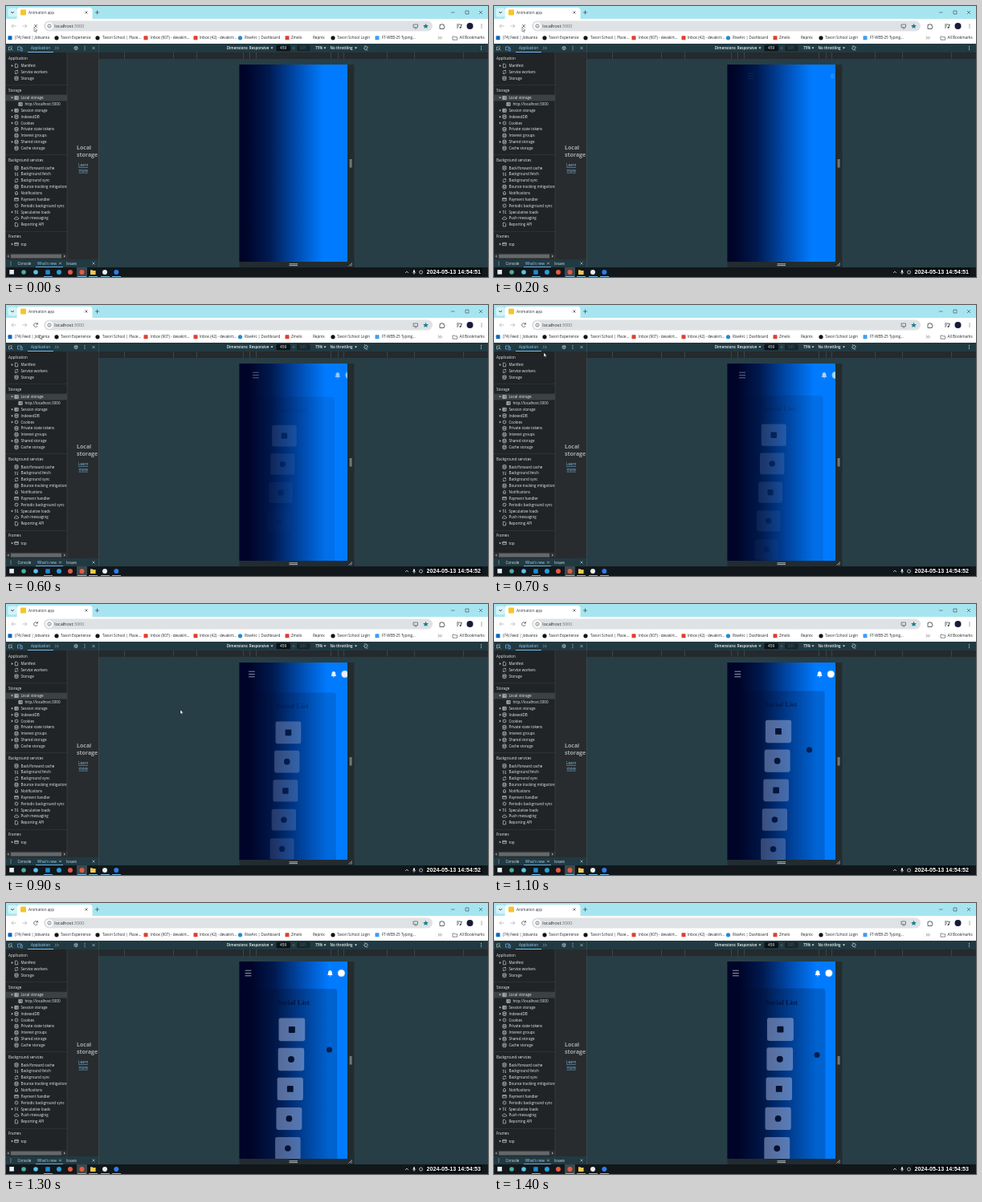
An HTML page for the animation above (1500 ms loop, 600 by 338 pixels).

```html
<!DOCTYPE html>
<html lang="en">
<head>
<meta charset="utf-8">
<title>Animation app</title>
<style>
  html, body { margin: 0; width: 100%; height: 100%; overflow: hidden; background: #273e46; }
  svg { display: block; width: 100vw; height: 100vh; }
  text { font-family: "Open Sans", "Noto Sans", sans-serif; white-space: pre; }
</style>
</head>
<body>
<svg id="stage" viewBox="0 0 600 338" xmlns="http://www.w3.org/2000/svg"></svg>
<script>
const LOOP = 1500, STEP = 100;
const stage = document.getElementById('stage');
const out = [];
const add = s => out.push(s);

// Drawing helpers
const rect = (x, y, w, h, fill, r = 0, more = '') =>
  add(`<rect x="${x}" y="${y}" width="${w}" height="${h}" rx="${r}" fill="${fill}" ${more}/>`);
const dot = (x, y, r, fill, more = '') =>
  add(`<circle cx="${x}" cy="${y}" r="${r}" fill="${fill}" ${more}/>`);
const line = (d, color, w = 0.7, more = '') =>
  add(`<path d="${d}" fill="none" stroke="${color}" stroke-width="${w}" ${more}/>`);
const label = (x, y, s, fill, size = 4.5, more = '') =>
  add(`<text x="${x}" y="${y + size * 0.36}" font-size="${size}" fill="${fill}" ${more}>${s}</text>`);
const cross = (x, y, r, color, w = 0.7, more = '') =>
  line(`M${x - r} ${y - r}l${2 * r} ${2 * r}m0 ${-2 * r}l${-2 * r} ${2 * r}`, color, w, more);
const caret = (x, y, color) => add(`<path d="M${x} ${y - 1}h3l-1.5 2z" fill="${color}"/>`);
const more = (x, y, color) => [-2, 0, 2].forEach(d => dot(x, y + d, 0.55, color));

function browser() {
  const ink = '#3c4043', pale = '#a9aeb3';
  rect(0, 0, 600, 17, '#a6e5f0');
  rect(2.5, 2.5, 11, 11, '#d3f3f8', 3);
  line('M6 7l2 2l2 -2', '#203038', 0.8);
  rect(13.5, 2, 94, 20, '#fff', 3.5);
  rect(18, 4.5, 7, 7, '#f6c52b', 1);
  label(28, 8, 'Animation app', '#303438', 4.7);
  cross(100, 8, 1.5, ink);
  line('M113.5 5.5v5m-2.5 -2.5h5', ink);
  line('M554 8h4.5M572 6h4v4h-4z', ink, 0.6);
  cross(591, 8, 2, ink, 0.6);

  rect(0, 16, 600, 31, '#fff');
  line('M12.5 25h-5.5m2.3 -2.3l-2.3 2.3l2.3 2.3M20.5 25h5.5m-2.3 -2.3l2.3 2.3l-2.3 2.3', pale);
  cross(37, 25, 1.9, ink, 0.7, 'id="stop"');
  line('M39.2 24a2.4 2.4 0 1 0 0 2M39.4 22v2.1h-2.1', ink, 0.7, 'id="reload"');
  rect(47, 18.5, 484, 13, '#dfe2e4', 6.5);
  dot(54, 25, 4.6, '#fff');
  dot(54, 25, 2.2, 'none', `stroke="${ink}" stroke-width=".6"`);
  line('M54 24.6v1.6M54 23.5v.5', ink, 0.6);
  add(`<text x="60.3" y="26.9" font-size="5.5" fill="#202124">localhost<tspan fill="#6b7075">:3000</tspan></text>`);
  line('M507 23h5.5v3.6h-5.5zM508.5 28h3', '#44545e', 0.7);
  add('<path d="M522.5 21.7l1 2.2 2.4.2-1.8 1.6.6 2.4-2.2-1.3-2.2 1.3.6-2.4-1.8-1.6 2.4-.2z" fill="#16808f"/>');
  line('M540 23.5h1.6a1 1 0 1 1 2 0h1.5v1.6a1 1 0 1 1 0 2v1.4h-5.1z', ink, 0.8);
  line('M561 23h5M561 25h3M561 27h2M566.5 27v-3.6h1.5', ink, 0.8);
  dot(565.5, 27, 1, ink);
  dot(577.5, 25, 4, '#171a3a');
  more(592, 25, ink);

  const marks = [
    [5, 11, '(74) Feed | Jobvanta', '#0a66c2', 1], [63, 68, 'Tavori Experience', '#151515'],
    [114, 120, 'Tavori School | Place...', '#151515'], [174, 180, 'Inbox (907) - devakirt...', '#dd4033', 1],
    [236, 241, 'Inbox (42) - devakirt...', '#dd4033', 1], [291.5, 297, 'RiseArc | Dashboard', '#238bd0'],
    [350, 355, 'Zmelo', '#dd4033', 1], [0, 382, 'Repnix', ''],
    [407, 412, 'Tavori School Login', '#151515'], [462, 468, 'FT-WEB-25 Typing...', '#3f9df0', 1]
  ];
  for (const [ix, tx, name, color, square] of marks) {
    if (ix && square) rect(ix - 2.5, 37.3, 5, 5, color, 0.6);
    else if (ix) dot(ix, 39.8, 2.6, color);
    label(tx, 39.8, name, '#202428', 4.6);
  }
  line('M538 38l1.7 1.7l-1.7 1.7m2.5 -3.4l1.7 1.7l-1.7 1.7', ink, 0.6);
  line('M556 38h2l.7 .8h3v3.4h-5.7z', ink, 0.6);
  label(564.5, 39.8, 'All Bookmarks', '#202428', 4.7);
}

function listIcon(x, y, kind) {
  const c = '#d3d7da';
  const shapes = {
    db: 'M-2 -1.6a2 .9 0 1 0 4 0a2 .9 0 1 0 -4 0v3.2a2 .9 0 0 0 4 0v-3.2M-2 0a2 .9 0 0 0 4 0',
    grid: 'M-2.2 -2h4.4v4h-4.4zM-2.2 -.6h4.4M-2.2 .7h4.4M-.7 -2v4',
    page: 'M-1.7 -2.3h2.2l1.2 1.2v3.4h-3.4z',
    ring: 'M-2 0a2 2 0 1 0 4 0a2 2 0 1 0 -4 0M-.6 -.5h.4M.5 .6h.4',
    sync: 'M-2 0a2 2 0 0 1 3.4 -1.4M2 0a2 2 0 0 1 -3.4 1.4M1.6 -2.4v1.2h-1.2M-1.6 2.4v-1.2h1.2',
    swap: 'M-1.2 2.2v-4.2l-1 1M1.2 -2.2v4.2l1 -1',
    bell: 'M-2 1.3h4M-1.4 1.2v-1.7a1.4 1.4 0 0 1 2.8 0v1.7M-.4 2.2h.8',
    card: 'M-2.3 -1.7h4.6v3.4h-4.6zM-2.3 -.6h4.6',
    cloud: 'M-1.5 1.4a1.1 1.1 0 0 1 0 -2.2a1.7 1.7 0 0 1 3.2 .2a1 1 0 0 1 0 2z'
  };
  line(shapes[kind], c, 0.65, `transform="translate(${x} ${y})"`);
}

function tools() {
  const ink = '#eceef0', bar = '#213a42';
  rect(0, 58, 115.5, 258, '#282c2e');
  rect(0, 58, 76, 258, '#202426');
  rect(0, 47, 600, 11, bar);
  line('M8 51h-4.5v4h2M6 53l2.5 2.5m-2.5 -.7v-1.8h1.8', '#b9c0c5', 0.7);
  line('M14.5 51h4.5v1M14.5 51v4h2M18 52.5h2.3v3.3h-2.3z', '#79b8ee', 0.7);
  label(31, 52.5, 'Application', '#9cd3f5', 4.6);
  rect(27, 57, 32, 1, '#79b8ee');
  line('M61 50.8l1.7 1.7l-1.7 1.7m2.7 -3.4l1.7 1.7l-1.7 1.7', '#b9c0c5', 0.6);
  dot(87, 52.5, 1.9, 'none', 'stroke="#cfd4d7" stroke-width="1.2" stroke-dasharray="1 .5"');
  dot(87, 52.5, 0.7, '#cfd4d7');
  more(98, 52.5, '#cfd4d7');
  cross(109, 52.5, 1.6, '#cfd4d7', 0.6);

  rect(0, 110.7, 76, 7.8, '#3c4143');
  const head = (y, s) => label(3, y, s, ink, 4.55);
  head(65, 'Application');
  head(105, 'Storage');
  head(192.5, 'Background services');
  head(287.5, 'Frames');
  for (const y of [98, 185.5, 281]) rect(0, y, 76, 0.5, '#3d4042');

  // A leading > marks a row that can be opened, v one that is open.
  const group = (y, rows) => rows.forEach(([kind, name, sign], i) => {
    const cy = y + i * 7.85, deep = sign === '+' ? 5 : 0;
    listIcon(13 + deep, cy, kind);
    label(18.5 + deep, cy, name, ink, 4.55);
    if (sign === '>') add(`<path d="M6.8 ${cy - 1.5}l2 1.5l-2 1.5z" fill="#c3c7ca"/>`);
    if (sign === 'v') caret(6, cy, '#c3c7ca');
  });
  group(74.5, [['page', 'Manifest', '>'], ['sync', 'Service workers'], ['db', 'Storage']]);
  group(114.6, [['grid', 'Local storage', 'v'], ['grid', 'http://localhost:3000', '+'],
    ['grid', 'Session storage', '>'], ['db', 'IndexedDB', '>'], ['ring', 'Cookies', '>'],
    ['db', 'Private state tokens'], ['db', 'Interest groups'], ['db', 'Shared storage', '>'],
    ['db', 'Cache storage']]);
  group(202, [['db', 'Back/forward cache'], ['swap', 'Background fetch'], ['sync', 'Background sync'],
    ['db', 'Bounce tracking mitigations'], ['bell', 'Notifications'], ['card', 'Payment handler'],
    ['ring', 'Periodic background sync'], ['swap', 'Speculative loads', '>'],
    ['cloud', 'Push messaging'], ['page', 'Reporting API']]);
  group(297, [['card', 'top', '>']]);
  rect(0, 308.5, 76, 7, '#2d2f31');
  rect(6, 309.7, 63, 4.8, '#65686a');
  add('<path d="M3.5 310.5v3.2l-2 -1.6zM72 310.5v3.2l2 -1.6z" fill="#9a9da0"/>');

  rect(76, 58, 39.5, 258, '#282c2e');
  rect(75.7, 58, 0.6, 258, '#43474a');
  label(88, 176, 'Local', '#a2a7ab', 7, 'font-weight="700"');
  label(88, 185, 'storage', '#a2a7ab', 7, 'font-weight="700"');
  label(90, 198.5, 'Learn', '#83c7f5', 4.6, 'text-decoration="underline"');
  label(90.5, 205.2, 'more', '#83c7f5', 4.6, 'text-decoration="underline"');

  rect(0, 316, 115.5, 10, bar);
  more(6, 321, '#cfd4d7');
  label(14.5, 321, 'Console', '#dfe4e7', 4.5);
  label(39, 321, 'What\'s new', '#9cd3f5', 4.5);
  cross(67.5, 321, 1.3, '#cfd4d7', 0.6);
  rect(37, 325, 34, 0.9, '#79b8ee');
  label(75, 321, 'Issues', '#dfe4e7', 4.5);
  cross(109, 321, 1.5, '#cfd4d7', 0.6);
  rect(115, 47, 0.7, 279, '#47545a');
}

function device() {
  const ink = '#edf3f5';
  const bold = 'font-weight="600"';
  label(274.8, 52.5, 'Dimensions: Responsive', ink, 4.5, bold);
  caret(329.5, 52.5, ink);
  rect(336.5, 48.7, 17.5, 7.5, '#0c1417', 1);
  label(341, 52.5, '459', ink, 4.8);
  cross(358, 52.5, 1, '#91a0a5', 0.5);
  rect(362, 48.7, 16.5, 7.5, '#17262c', 1);
  label(366, 52.5, '835', '#506168', 4.6);
  label(385, 52.5, '75%', ink, 4.5, bold);
  caret(395.5, 52.5, ink);
  label(403.5, 52.5, 'No throttling', ink, 4.5, bold);
  caret(434, 52.5, ink);
  line('M445.5 52.6l3 -2.6l2 2.2l-3 2.7zM446 50.4l1 -1.2M450 54.6l-1 1.2', ink, 0.7);
  more(591.5, 52.5, ink);
  rect(115.5, 58, 484.5, 8, '#242a2d');
  for (const x of [147, 208, 237, 295, 303, 311, 404, 413, 420, 474, 508, 569])
    rect(x, 58, 0.5, 7.6, '#566065');
  rect(290.5, 73, 143, 253, '#222c30');
  rect(427.6, 191, 3, 10.5, '#6f787b');
  rect(352.5, 321.3, 10.5, 0.9, '#c0c6c8');
  rect(352.5, 323.2, 10.5, 0.9, '#c0c6c8');
  line('M426.5 324.5l4.5 -4M429 324.5l2 -1.8', '#c0c6c8', 0.8);
}

function app() {
  add(`<defs><clipPath id="screen"><path d="M290.5 73h134.5v246h-134.5z"/></clipPath>
    <linearGradient id="sky" gradientUnits="userSpaceOnUse" x1="298" x2="395" y1="0" y2="0">
      <stop offset="0" stop-color="#000428"/><stop offset=".3" stop-color="#001a50"/>
      <stop offset=".65" stop-color="#004bad"/><stop offset="1" stop-color="#007bff"/>
    </linearGradient></defs><g clip-path="url(#screen)">`);
  rect(290, 73, 136, 247, 'url(#sky)');
  rect(0, 0, 1, 240, '#000a28', 4, 'id="panel"');
  add(`<text id="title" text-anchor="middle" font-size="9" font-weight="700" fill="#020d2c"
    style="font-family:'Liberation Serif',serif">Social List</text>`);
  for (let i = 0; i < 5; i++) {
    add(`<g class="card">`);
    rect(-16.5, -14.5, 33, 29, '#b9c4e8', 2.5, 'fill-opacity=".47"');
    if (i % 2 || i === 4) dot(0, 0, 4, '#07112f');
    else rect(-4, -4, 8, 8, '#07112f', 1);
    add('</g>');
  }
  add('<g id="menu">');
  line('M-3.9 -3.3h7.8M-3.9 0h7.8M-3.9 3.3h7.8', '#c9d4ea', 0.8);
  add('</g><g id="icons">');
  add('<path d="M-3.4 2.4q1 -.8 1 -2.2v-1.2a2.4 2.4 0 0 1 1.8 -2.2a.6 .6 0 0 1 1.2 0a2.4 2.4 0 0 1 1.8 2.2v1.2q0 1.4 1 2.2zM-1 3h2a1 1 0 0 1 -2 0z" fill="#fff"/>');
  dot(14, 0, 4.8, '#7fb2f0');
  dot(14, 0, 4, '#fff');
  add('</g></g>');
}

function taskbar() {
  rect(0, 326, 600, 12, '#11171b');
  rect(4.3, 329, 5.6, 5.6, '#e7eef2');
  rect(88, 326, 13, 12, '#3d484d');
  dot(22, 332, 2.8, '#4fae9a');
  dot(37, 332, 2.8, '#5dc3e6');
  rect(49.2, 329.2, 5.6, 5.6, '#1f8ad2', 0.6);
  dot(66, 332, 3, '#28a0d8');
  dot(80, 332, 3, '#e45b42');
  dot(94.5, 332, 3, '#e45b42');
  add('<path d="M105 329.3h2.4l.8 .8h3.4v4.8h-6.6z" fill="#f3c84b"/>');
  dot(123, 332, 3, '#e8edf0');
  dot(137.3, 332, 3, '#2d7df0');
  for (const x of [47, 89, 103, 118, 132]) rect(x, 337, 11, 1, '#6fb6de');
  line('M497 333l2 -2l2 2', '#e8edf0', 0.7);
  rect(507, 329.2, 2, 3.5, '#e8edf0', 1);
  line('M506.2 331.7a1.8 1.8 0 0 0 3.6 0M508 333.6v1.4', '#e8edf0', 0.5);
  dot(516.5, 332, 2, 'none', 'stroke="#e8edf0" stroke-width=".7"');
  rect(521.5, 326.8, 71, 9, '#05090b');
  add(`<text id="clock" x="523.5" y="333.7" font-size="7.2" font-weight="700" fill="#fff"
    style="font-family:'Liberation Sans',sans-serif"></text>`);
}

rect(0, 0, 600, 338, '#273e46');
browser();
tools();
device();
app();
taskbar();
add('<circle id="ball" r="3.6" fill="#06204f"/>');
add('<path id="arrow" d="M0 0v5.2l1.2 -1.1l.9 2l.9 -.4l-.9 -1.9h1.7z" fill="#fff" stroke="#111" stroke-width=".4"/>');
stage.innerHTML = out.join('');

const $ = id => document.getElementById(id);
const cards = [...document.querySelectorAll('.card')];
const clamp = v => Math.min(1, Math.max(0, v));
const set = (el, attrs) => { for (const k in attrs) el.setAttribute(k, attrs[k]); };
const show = (el, on) => set(el, { visibility: on ? 'visible' : 'hidden' });

// Remaining slide distance, easing out towards the end of the loop
const slide = t => 14.3 * Math.pow(Math.max(0, 1500 - t) / 1100, 1.65) + 0.3;

const pointer = [
  [0, 35, 26.5], [500, 35, 26.5], [600, 42, 37], [700, 62, 59.5], [800, 122, 88],
  [900, 217, 132], [1000, 320, 164], [1100, 392.5, 182], [1200, 400, 182.5],
  [1300, 402.5, 183], [1400, 402, 189.5]
];
function pointerAt(t) {
  const i = pointer.findIndex(p => p[0] >= t);
  if (i < 1) return pointer[0].slice(1);
  const a = pointer[i - 1], b = pointer[i], k = (t - a[0]) / (b[0] - a[0]);
  return [a[1] + (b[1] - a[1]) * k, a[2] + (b[2] - a[2]) * k];
}

function draw(t) {
  const d = slide(t);
  const zoom = y => 280 + (y - 280) * (1 - 0.0045 * d);
  const shift = 7 * clamp((t - 100) / 1100);
  set($('sky'), { gradientTransform: `translate(${shift} 0)` });

  const fade = clamp((t - 100) / 900);
  set($('menu'), { transform: `translate(${300.3 + d} 87.5)`, opacity: fade * 0.9 });
  set($('icons'), { transform: `translate(${402.3 + d} 87.5)`, opacity: fade });

  const left = 301 - 0.2 * d;
  set($('panel'), {
    x: left, y: 106 + 0.8 * d, width: 412.6 - 0.33 * d - left,
    opacity: 0.22 * clamp((t - 200) / 1000)
  });
  set($('title'), { x: 358 - d * 0.3, y: zoom(126.3), opacity: 0.75 * clamp((t - 500) / 800) });

  cards.forEach((card, i) => {
    const c = slide(t - i * 110);
    set(card, {
      transform: `translate(${357 - c} ${zoom(157.3 + 37.2 * i)}) scale(${1 - 0.007 * c})`,
      opacity: clamp((t - i * 60 - 400) / 750)
    });
  });

  const [x, y] = pointerAt(t), inside = x > 290;
  show($('arrow'), !inside);
  show($('ball'), inside);
  set($('arrow'), { transform: `translate(${x} ${y})` });
  set($('ball'), { cx: x, cy: y });
  show($('stop'), t < 600);
  show($('reload'), t >= 600);
  $('clock').textContent = '2024-05-13 14:54:' + (t < 300 ? 51 : t < 1300 ? 52 : 53);
}

let start = null;
function tick(now) {
  if (start === null) start = now;
  draw(Math.floor(((now - start) % LOOP) / STEP) * STEP);
  requestAnimationFrame(tick);
}
draw(0);
requestAnimationFrame(tick);
</script>
</body>
</html>
```
